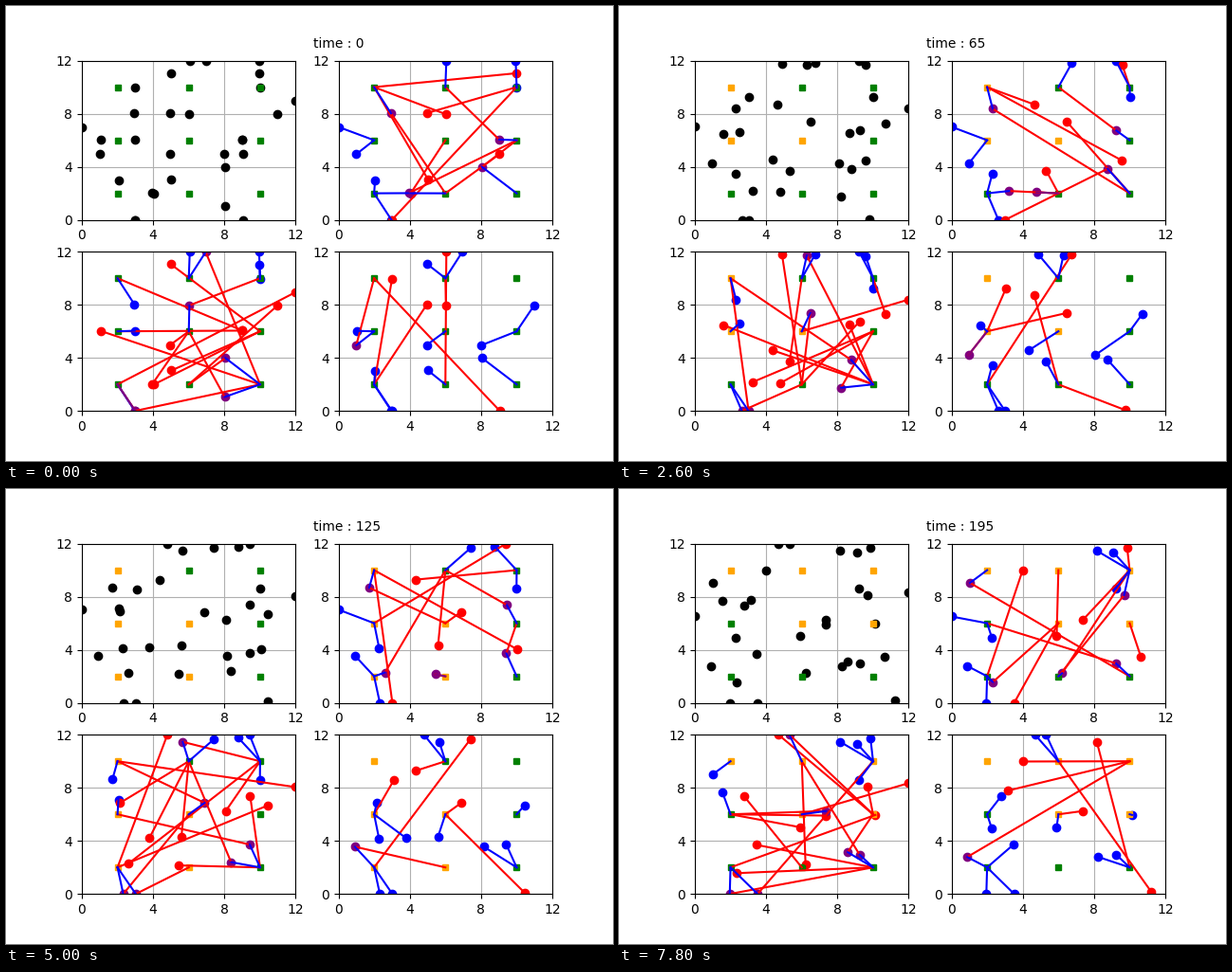
A matplotlib script for the animation above (8000 ms loop, 640 by 480 pixels).

```python
import numpy as np
import matplotlib.pyplot as plt
from matplotlib.animation import FuncAnimation

STEP, FRAMES = 5, 40
SPEED = 1 / 90      # distance per time unit
LEAD = 5            # walkers set off this long before time 0

STATIONS = np.array([(x, y) for y in (10, 6, 2) for x in (2, 6, 10)])
# times at which each station switches between free and busy
SWITCHES = [(52,), (127, 157, 182), (22, 52, 157), (22, 182), (52, 157, 182),
            (157,), (22, 52, 87, 182), (22, 52, 87, 157), (22, 52)]

# start x, y, heading in degrees, panels with a link to the nearest station,
# panels with a link to a random one
WALKERS = [
    (0, 7, 179, "A", ""), (1, 5, -93, "AC", "C"), (1, 6, 37, "C", "B"),
    (3, 10, -86, "", "C"), (3, 8, 152, "AB", "A"), (3, 6, 131, "B", ""),
    (2, 3, 0, "AC", ""), (4, 2, 167, "A", "AB"), (4, 2, 6, "A", "AB"),
    (3, 0, -118, "ABC", "B"), (3, 0, -89, "BC", "AB"), (5, 11, 98, "C", "B"),
    (5, 8, 117, "", "AC"), (5, 5, -147, "C", "B"), (5, 3, 66, "C", "AB"),
    (6, 12, -14, "AB", "C"), (7, 12, -158, "BC", "B"), (6, 8, -52, "B", "ABC"),
    (10, 12, 180, "AB", ""), (10, 11, 122, "B", "A"), (10, 10, -89, "AB", ""),
    (11, 8, -113, "C", "B"), (12, 9, -51, "", "B"), (9, 6, 72, "A", "AB"),
    (9, 6, 107, "", "B"), (9, 5, -43, "", "A"), (8, 5, -84, "C", ""),
    (8, 4, -11, "ABC", "AB"), (8, 1, 75, "B", "B"), (9, 0, 4, "", "C"),
]
# later changes of heading: walker -> (time, heading)
TURNS = {
    0: [(148, -90)], 6: [(22, 91)], 7: [(122, -112)], 10: [(148, -20)],
    13: [(172, -65)], 16: [(135, 112)], 18: [(105, -92), (165, 0)],
    19: [(112, 50), (165, -60)], 20: [(122, 178)], 22: [(105, 0), (168, 90)],
    24: [(50, -155)], 27: [(125, -103)],
}


def position(i, t):
    """Walk straight at constant speed between turns, stopped by the walls."""
    x, y, heading = WALKERS[i][:3]
    p, start = np.array([x, y], float), -LEAD
    for turn, new in TURNS.get(i, []) + [(t, 0)]:
        end = min(turn, t)
        a = np.radians(heading)
        p = np.clip(p + SPEED * (end - start) * np.array([np.cos(a), np.sin(a)]), 0, 12)
        if turn >= t:
            break
        start, heading = end, new
    return p


def nearest(p):
    return int(np.argmin(((STATIONS - p) ** 2).sum(axis=1)))


def busy(s, t):
    return sum(t > switch for switch in SWITCHES[s]) % 2 == 1


fig, axes = plt.subplots(2, 2, figsize=(6.4, 4.8), dpi=100)
axes = axes.ravel()
for ax in axes:
    ax.set(xlim=(0, 12), ylim=(0, 12), xticks=range(0, 13, 4), yticks=range(0, 13, 4))
    ax.grid(True)
label = axes[0].text(13, 13, "")
drawn = []


def dots(ax, pts, color, z):
    if len(pts):
        drawn.extend(ax.plot(*np.transpose(pts), "o", color=color, ms=6, zorder=z))


def link(ax, p, s, color, z):
    drawn.extend(ax.plot(*zip(p, STATIONS[s]), color=color, zorder=z))


def stations(ax, t):
    for s, (x, y) in enumerate(STATIONS):
        color = "orange" if busy(s, t) else "green"
        drawn.extend(ax.plot(x, y, "s", color=color, ms=4, zorder=2.3))


def panel(ax, name, pos, rng):
    near, far = {}, {}
    for i, (*_, near_in, far_in) in enumerate(WALKERS):
        if name in near_in:
            near[i] = nearest(pos[i])
        if name in far_in:
            far[i] = int(rng.integers(9))
    both = far.keys() & near.keys()
    for i, s in far.items():
        link(ax, pos[i], s, "red", 2.4)
    for i, s in near.items():
        link(ax, pos[i], s, "purple" if far.get(i) == s else "blue", 2.5)
    dots(ax, [pos[i] for i in near if i not in both], "blue", 2.1)
    dots(ax, [pos[i] for i in far if i not in both], "red", 2.15)
    dots(ax, [pos[i] for i in sorted(both)], "purple", 2.2)


def update(frame):
    while drawn:
        drawn.pop().remove()
    t = frame * STEP
    pos = [position(i, t) for i in range(len(WALKERS))]
    rng = np.random.default_rng(frame)
    label.set_text(f"time : {t}")
    dots(axes[0], pos, "black", 2.1)
    for name, ax in zip("ABC", axes[1:]):
        panel(ax, name, pos, rng)
    for ax in axes:
        stations(ax, t)
    return drawn


anim = FuncAnimation(fig, update, frames=FRAMES, interval=200, repeat=True, blit=False)
plt.show()
```
